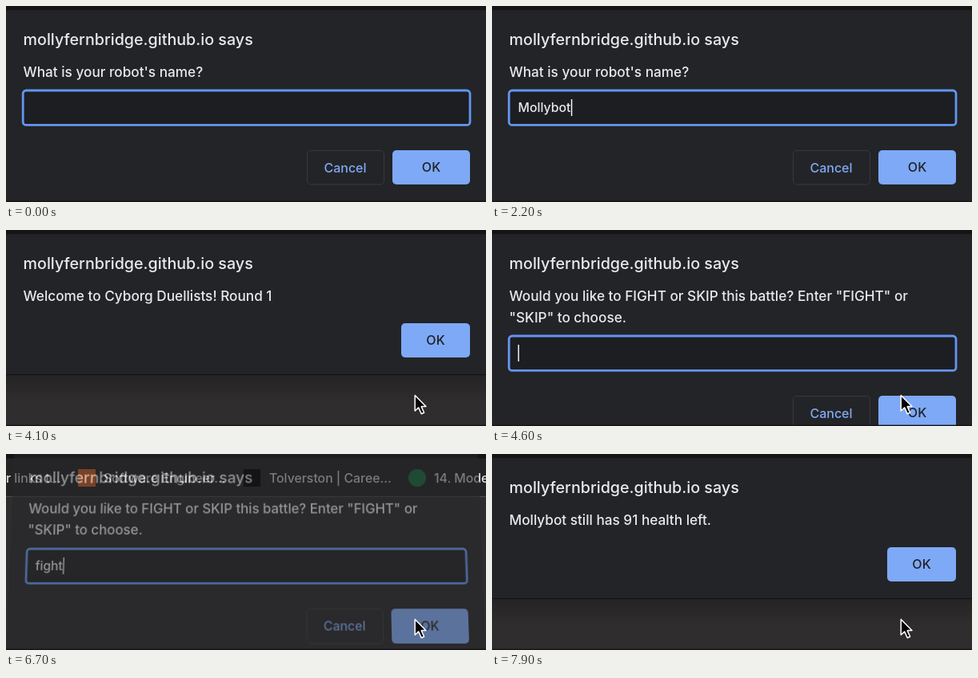
Animation of 600x246 px, one loop 8 s. Source, as an HTML page:

```html
<!DOCTYPE html>
<html lang="en">
<head>
<meta charset="utf-8">
<title>Robot game dialogs</title>
<style>
  html, body { margin: 0; width: 100%; height: 100%; overflow: hidden; background: #2f2d2e; }
  svg { position: absolute; left: 0; top: 0; width: 600px; height: 246px; overflow: hidden; }
  #dialog { overflow: visible; transform-origin: 0 0; }
  text { font-family: Inter, "Open Sans", sans-serif; font-weight: 500; fill: #e8eaed; }
  .title { font-size: 19.7px; }
  .message { font-size: 17.2px; }
  .entry { font-size: 15.8px; }
  .button { font-size: 16px; text-anchor: middle; }
  .bookmark { font-size: 15.8px; fill: #e4e2e4; }
</style>
</head>
<body>
<svg viewBox="0 0 600 246">
  <rect width="600" height="246" fill="#2f2d2e"/>
  <rect width="600" height="54" fill="#252425"/>
  <rect y="53" width="600" height="1" fill="#504e50"/>
  <rect width="600" height="5.5" fill="#171416"/>
  <text class="bookmark" x="0" y="35.5">r links t...</text>
  <rect x="90" y="19" width="22" height="22" fill="#d9662b"/>
  <text class="bookmark" x="122" y="35.5">Software Engineer...</text>
  <rect x="297" y="19" width="21" height="22" fill="#000"/>
  <text class="bookmark" x="329" y="35.5">Tolverston | Caree...</text>
  <circle cx="514" cy="30" r="11" fill="#187a42"/>
  <text class="bookmark" x="535" y="35.5">14. Mode</text>
</svg>

<svg id="dialog" viewBox="0 0 600 246">
  <defs>
    <linearGradient id="shade" x2="0" y2="1">
      <stop offset="0" stop-opacity=".2"/>
      <stop offset="1" stop-opacity="0"/>
    </linearGradient>
  </defs>
  <rect id="shadow" width="600" height="32" fill="url(#shade)"/>
  <rect id="panel" y="5.5" width="600" fill="#232427"/>
  <rect id="edge" width="600" height="1.2" fill="#131315"/>
  <text class="title" x="21.5" y="49">mollyfernbridge.github.io says</text>
  <text id="line1" class="message" x="21.5" y="88.5"></text>
  <text id="line2" class="message" x="21.5" y="115.5"></text>
  <g id="prompt">
    <rect x="21.2" y="106" width="558.8" height="43.4" rx="4" fill="#1d1e21" stroke="#6296f2" stroke-width="2.8"/>
    <text id="entry" class="entry" x="32.5" y="133.2"></text>
    <rect id="caret" y="117" width="1.4" height="21" fill="#fff"/>
    <rect x="376.5" y="181.5" width="96" height="42.5" rx="4.5" fill="none" stroke="#37393d"/>
    <text class="button" x="424" y="208.5" style="fill:#80a9f5">Cancel</text>
  </g>
  <rect id="okBox" height="43" rx="5"/>
  <text id="okText" class="button" style="fill:#202124">OK</text>
</svg>

<svg viewBox="0 0 600 246">
  <rect y="244.6" width="600" height="1.4" fill="#171317"/>
  <path id="pointer" d="M0 0V19.5L4.5 15.4L8 23.2L11.4 21.7L8 14.1H13.8Z"
        fill="#000" stroke="#fff" stroke-width="1.5" stroke-linejoin="round"/>
</svg>

<script>
const LOOP = 8000, STEP = 100;
const el = id => document.getElementById(id);
const set = (id, attrs) => {
  for (const name in attrs) el(id).setAttribute(name, attrs[name]);
};

// Each dialog closes over one step and the next one opens over another.
const dialogs = [
  { close: 3100, lines: ["What is your robot's name?"], text: "Mollybot",
    keys: [900, 1000, 1100, 1300, 1400, 1500, 1700, 1800], focus: 300 },
  { close: 4200, lines: ["Welcome to Cyborg Duellists! Round 1"] },
  { close: 6700, lines: ['Would you like to FIGHT or SKIP this battle? Enter "FIGHT" or', '"SKIP" to choose.'],
    text: "fight", keys: [5900, 6000, 6100, 6200, 6300], focus: 4400 },
  { close: 7700, lines: ["Mollybot still has 91 health left."] },
  { close: Infinity, lines: ["Mollybot still has 91 health left."] }
];

function caretOn(d, t) {
  const last = d.keys.filter(k => k <= t).pop() ?? d.focus;
  return t >= last && (t - last) % 1000 < 500;
}

// Tilts the dialog back and lifts it; tilt 0 is at rest.
function tiltMatrix(tilt) {
  const lean = 0.000125 * tilt, depth = 0.035 * tilt, centre = 301;
  return `matrix3d(1,0,0,0, ${-centre * lean},${1 - 0.0032 * tilt},0,${-lean},
    0,0,1,0, ${centre * depth},${-11.4 * tilt},0,${1 + depth})`;
}

function drawDialog(d, t) {
  const isPrompt = Boolean(d.text);
  const shift = 27 * (d.lines.length - 1);
  const bottom = isPrompt ? 247 + shift : 182;
  set("panel", { height: bottom - 5.5 });
  set("edge", { y: bottom - 1 });
  set("shadow", { y: bottom });
  el("line1").textContent = d.lines[0];
  el("line2").textContent = d.lines[1] || "";

  set("prompt", { display: isPrompt ? "inline" : "none", transform: `translate(0 ${shift})` });
  if (isPrompt) {
    const typed = d.keys.filter(k => k <= t).length;
    el("entry").textContent = d.text.slice(0, typed);
    const width = typed ? el("entry").getComputedTextLength() : -0.5;
    set("caret", { x: 33 + width, opacity: caretOn(d, t) ? 1 : 0 });
  }

  const okX = isPrompt ? 483 : 494, okY = isPrompt ? 181 + shift : 117;
  const hovered = t >= 2600 && t <= 3100;
  set("okBox", { x: okX, y: okY, width: 580 - okX, fill: hovered ? "#6b87bd" : "#7ea9f6" });
  set("okText", { x: (580 + okX) / 2, y: okY + 27.4 });
}

function drawPointer(t) {
  const p = Math.min(1, Math.max(0, (t - 2200) / 400));
  const rest = (1 - p) ** 2;
  set("pointer", {
    display: p > 0 ? "inline" : "none",
    transform: `translate(${511.2 + 40 * rest} ${207.5 + 45 * rest})`
  });
}

function render(time) {
  const t = Math.floor((time % LOOP) / STEP) * STEP;
  const index = dialogs.findIndex(d => t <= d.close);
  const d = dialogs[index];
  const closing = t === d.close;
  const opening = index > 0 && t === dialogs[index - 1].close + STEP;
  drawDialog(d, t);
  el("dialog").style.opacity = closing ? 0.55 : opening ? 0.7 : 1;
  el("dialog").style.transform = tiltMatrix(closing ? 1 : opening ? 0.4 : 0);
  drawPointer(t);
}

const start = performance.now();
function tick() {
  render(performance.now() - start);
  requestAnimationFrame(tick);
}
tick();
</script>
</body>
</html>
```
